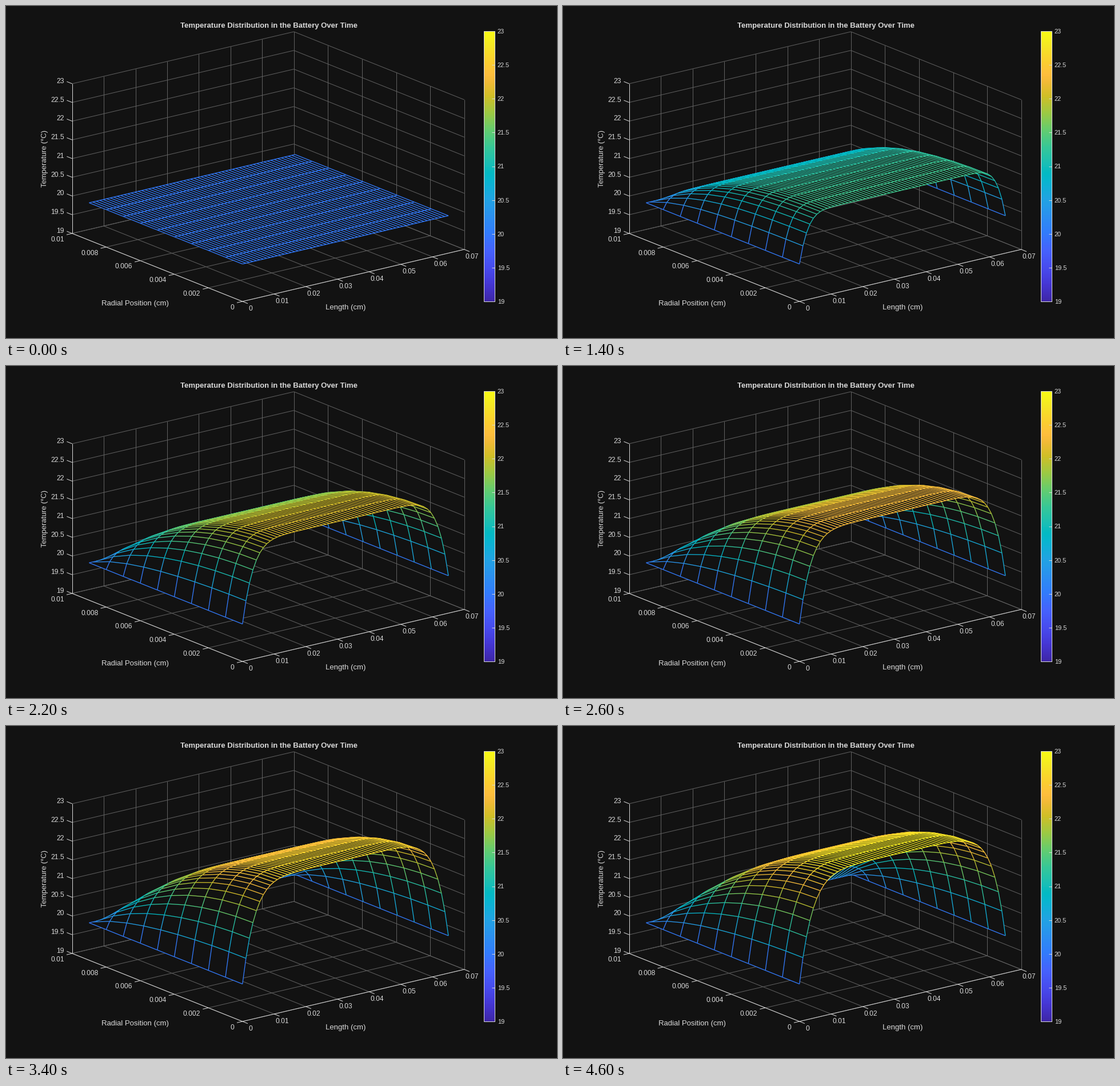
A matplotlib script for the animation above (4.8 s loop, 964 by 581 pixels).

```python
import numpy as np
import matplotlib.pyplot as plt
from matplotlib.animation import FuncAnimation
from matplotlib.collections import LineCollection
from matplotlib.colors import LinearSegmentedColormap
from matplotlib.patches import Rectangle

W, H, DPI = 964, 581, 100
PX = 72 / DPI                      # points per pixel
BG, INK, GRID = "#121212", "#d9d9d9", "#606060"

PARULA = [(0, "#3e26a8"), (4, "#4537d5"), (8, "#484df0"), (12, "#4563fd"),
          (16, "#327cfc"), (20, "#2b91ef"), (24, "#20a5e3"), (28, "#08b5d0"),
          (30, "#02bac3"), (32, "#19bfb6"), (36, "#37c897"), (40, "#64cd6f"),
          (44, "#9dc943"), (48, "#d1bf27"), (51, "#f0ba36"), (53, "#febe3d"),
          (56, "#fccf30"), (60, "#f5e924"), (63, "#f9fb15")]
cmap = LinearSegmentedColormap.from_list(
    "parula", [(i / 63, c) for i, c in PARULA], N=256)

# Orthographic view: pixel vectors spanning each full axis
ORIGIN = np.array([413.7, 517.0])
AX_L, AX_R, AX_Z = np.array([[388.0, -91.0], [-298.0, -119.0], [0.0, -262.0]])
L_MAX, R_MAX, Z_MIN, Z_MAX = 0.07, 0.01, 19, 23


def project(l, r, z):
    parts = (l / L_MAX, r / R_MAX, (z - Z_MIN) / (Z_MAX - Z_MIN))
    return ORIGIN + sum(np.multiply.outer(p, a)
                        for p, a in zip(parts, (AX_L, AX_R, AX_Z)))


# Heat conduction in a cylinder with its surface held at 20 degrees
NL, NR, STEPS, SUB = 60, 10, 20, 24
LEN, RAD = 0.065, 0.009
STEADY, TAU = 2.97, 5.79           # final rise on the axis, time constant
DIFF = 81 / (5.783 * TAU)
HEAT = 4 * DIFF * STEADY / 81
CELL = LEN / (NL - 1) / 0.001


def simulate():
    rise = np.zeros((NL, NR))
    k = np.arange(1, NR - 1)
    history = [rise + 20]
    for _ in range(STEPS):
        for _ in range(SUB):
            t = rise[1:-1]
            radial = np.empty((NL - 2, NR - 1))
            radial[:, 0] = 4 * (t[:, 1] - t[:, 0])
            radial[:, 1:] = (t[:, 2:] - 2 * t[:, 1:-1] + t[:, :-2]
                             + (t[:, 2:] - t[:, :-2]) / (2 * k))
            axial = (rise[2:] - 2 * t + rise[:-2])[:, :-1] / CELL ** 2
            rise[1:-1, :-1] += (DIFF * (radial + axial) + HEAT) / SUB
        history.append(rise + 20)
    return history


def mesh_items():
    """Faces and edges from back to front; every edge appears once."""
    items = []
    for i in range(NL - 2, -1, -1):
        for k in range(NR - 2, -1, -1):
            a, b, c, d = (i, k), (i + 1, k), (i + 1, k + 1), (i, k + 1)
            items += [(a, b, c, d), (b, c), (d, c)]
            if i == 0:
                items.append((a, d))
            if k == 0:
                items.append((a, b))
    return items


history = simulate()
items = [np.array(it) for it in mesh_items()]
first_i, first_k = np.array([it[0] for it in items]).T
is_face = np.array([len(it) == 4 for it in items])
grid_l, grid_r = np.meshgrid(np.linspace(0, LEN, NL),
                             np.linspace(0, RAD, NR), indexing="ij")

fig = plt.figure(figsize=(W / DPI, H / DPI), dpi=DPI, facecolor=BG)
ax = fig.add_axes([0, 0, 1, 1])
ax.axis("off")


def line(p, q, color=INK, zorder=3):
    ax.plot([p[0], q[0]], [p[1], q[1]], color=color, lw=PX,
            solid_capstyle="butt", zorder=zorder)


def text(x, y, s, size=12, ha="center", **kw):
    """Place text with its capitals centred on y."""
    ax.text(x, y + 0.36 * size, s, fontsize=size * PX, ha=ha, va="baseline",
            color=INK, family="Liberation Sans", **kw)


def draw_axes():
    l_ticks = np.arange(8) * 0.01
    r_ticks = np.arange(6) * 0.002
    z_ticks = np.arange(9) * 0.5 + 19

    def grid(p, q):
        line(project(*p), project(*q), GRID, 1)

    for l in l_ticks:
        grid((l, 0, Z_MIN), (l, R_MAX, Z_MIN))
        grid((l, R_MAX, Z_MIN), (l, R_MAX, Z_MAX))
    for r in r_ticks:
        grid((0, r, Z_MIN), (L_MAX, r, Z_MIN))
        grid((L_MAX, r, Z_MIN), (L_MAX, r, Z_MAX))
    for z in z_ticks:
        grid((0, R_MAX, z), (L_MAX, R_MAX, z))
        grid((L_MAX, R_MAX, z), (L_MAX, 0, z))

    corner = project(0, R_MAX, Z_MIN)
    line(ORIGIN, ORIGIN + AX_L)
    line(ORIGIN, corner)
    line(corner, corner + AX_Z)

    out_l = -10 * AX_L / np.hypot(*AX_L)
    out_r = -10 * AX_R / np.hypot(*AX_R)
    for l in l_ticks:
        p = project(l, 0, Z_MIN)
        line(p, p + out_r)
        text(p[0] + 14, p[1] + 12, f"{l:.2g}")
    for r in r_ticks:
        p = project(0, r, Z_MIN)
        line(p, p + out_l)
        text(p[0] - 14, p[1] + 9.5, f"{r:.2g}", ha="right")
    for z in z_ticks:
        p = project(0, R_MAX, z)
        line(p, p - out_r)
        text(p[0] - 14, p[1] - 5.5, f"{z:g}", ha="right")

    text(460, 33.5, "Temperature Distribution in the Battery Over Time", 13.1,
         weight="bold")
    text(225.5, 519, "Radial Position (cm)", 13.1)
    text(594.5, 526, "Length (cm)", 13.1)
    ax.text(67.5, 267, "Temperature (°C)", fontsize=13 * PX, color=INK,
            family="Liberation Sans", rotation=90, ha="center", va="center")


def draw_colorbar(x0=836, x1=855, top=44, bottom=517):
    ax.imshow(np.linspace(0, 1, 256)[:, None], cmap=cmap, origin="lower",
              extent=(x0, x1, bottom, top), aspect="auto",
              interpolation="nearest")
    ax.add_patch(Rectangle((x0, top), x1 - x0, bottom - top, fill=False,
                           ec=INK, lw=PX, zorder=3))
    for n in range(9):
        y = bottom - (bottom - top) * n / 8
        line((x1 - 5, y), (x1, y))
        text(860, y, f"{19 + n / 2:g}", 11, ha="left")


draw_axes()
draw_colorbar()
ax.set_xlim(0, W)
ax.set_ylim(H, 0)

surface = LineCollection([], facecolors=BG, linewidths=1.3 * PX, zorder=2)
ax.add_collection(surface, autolim=False)


def update(frame):
    temp = history[max(0, frame - 3)]
    pts = project(grid_l, grid_r, temp)
    colors = cmap((temp[first_i, first_k] - Z_MIN) / (Z_MAX - Z_MIN))
    colors[is_face, 3] = 0
    surface.set_segments([pts[it[:, 0], it[:, 1]] for it in items])
    surface.set_edgecolor(colors)
    return [surface]


anim = FuncAnimation(fig, update, frames=24, interval=200, repeat=True)
plt.show()
```
